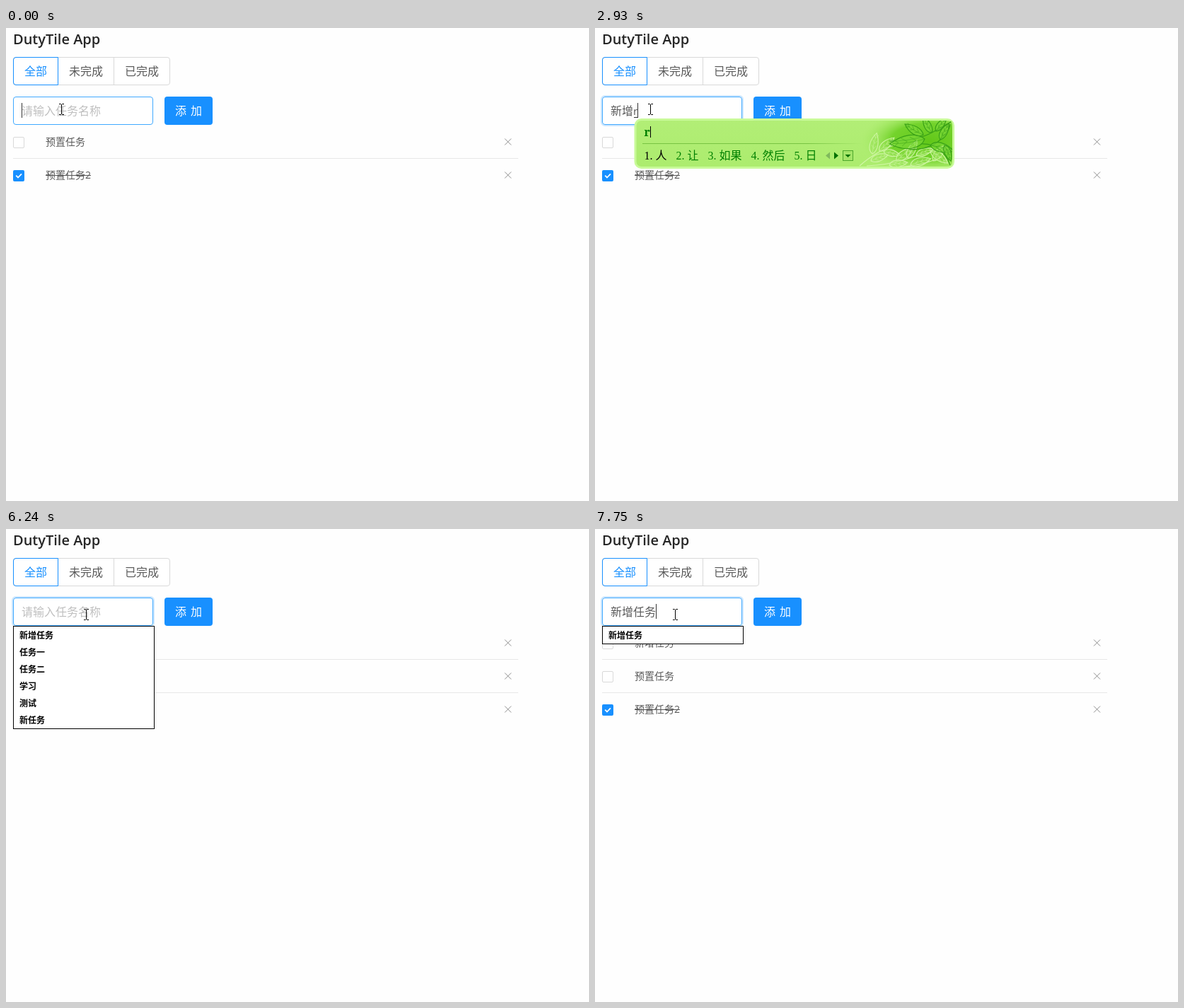
These frames come from a looping animation (824 by 669 pixels, 8 s). An HTML page:

```html
<!DOCTYPE html>
<html lang="zh">
<head>
<meta charset="utf-8">
<title>DutyTile App</title>
<style>
html, body { margin: 0; width: 100%; height: 100%; overflow: hidden; background: #fefefe; }
svg { display: block; width: 824px; height: 669px; }
text { font-family: "Open Sans", "Noto Sans CJK SC", "Noto Sans CJK", sans-serif; font-size: 16px; fill: #595959; white-space: pre; }
.title { font-size: 20px; fill: #262626; font-weight: 600; }
.item { font-size: 14px; }
.latin { font-size: 15px; }
.digit { font-family: "Liberation Serif", serif; }
.pinyin { font: bold 16px "Noto Serif", serif; fill: #008000; }
.hint { font-size: 12px; font-weight: 700; fill: #000; }
</style>
</head>
<body>
<svg viewBox="0 0 824 669">
  <defs>
    <linearGradient id="panel" x2="0" y2="1">
      <stop offset="0" stop-color="#b2ee76"/><stop offset="1" stop-color="#acec6e"/>
    </linearGradient>
    <linearGradient id="rule">
      <stop offset="0" stop-color="#78c442"/><stop offset=".75" stop-color="#78c442"/>
      <stop offset="1" stop-color="#78c442" stop-opacity="0"/>
    </linearGradient>
    <radialGradient id="glade" cx=".76" cy=".45" r=".72">
      <stop offset="0" stop-color="#62c719"/><stop offset=".55" stop-color="#74d32c"/>
      <stop offset="1" stop-color="#aeed70" stop-opacity="0"/>
    </radialGradient>
    <clipPath id="artClip"><path d="M-140 3H-9Q-3 3 -3 9V62Q-3 68 -9 68H-140Z"/></clipPath>
    <g id="art" clip-path="url(#artClip)"></g>
  </defs>
  <g id="page"></g><g id="list"></g><g id="field"></g><g id="drop"></g><g id="ime"></g><g id="mouse"></g>
</svg>
<script>
const LOOP = 8000;
const $ = id => document.getElementById(id);
const text = (x, y, s, cls = '', fill = '') =>
  `<text x="${x}" y="${y}" class="${cls}"${fill && ` style="fill:${fill}"`}>${s}</text>`;
const rect = (x, y, w, h, fill, stroke = 'none', r = 0, extra = '') =>
  `<rect x="${x}" y="${y}" width="${w}" height="${h}" rx="${r}" fill="${fill}" stroke="${stroke}" ${extra}/>`;
const path = (d, stroke, w = 1, fill = 'none') =>
  `<path d="${d}" fill="${fill}" stroke="${stroke}" stroke-width="${w}"/>`;

// Tracks hold [start, value]; the latest started value applies.
const at = (track, t) => {
  let v = track[0][1];
  for (const [start, next] of track) if (start <= t) v = next;
  return v;
};

const input = [
  [0, ''], [1130, 'xin'], [1530, 'xinz'], [1650, 'xinze'], [1770, 'xinzen'], [2200, 'xinzeng'],
  [2510, '新增'], [2930, '新增r'], [3050, '新增renw'], [3180, '新增renwu'], [3300, '新增任务'], [3990, ''],
  [6390, 'x'], [6540, 'xinz'], [6820, 'xinzen'], [6940, 'xinzeng'],
  [7240, '新增'], [7480, '新增r'], [7630, '新增renwu'], [7750, '新增任务']
];
const caret = [
  [0, 1], [550, 0], [1130, 1], [2510, 0], [2630, 1], [3840, 0], [3990, 1], [4140, 0],
  [4710, 1], [5260, 0], [5530, 1], [6240, 0], [6390, 1]
];
const glow = [[0, 0], [150, .5], [270, 1]];
const fade = [[0, 1], [3840, .6], [3990, .7], [4140, .85], [4290, 1]];

const wide = '新增 心脏 新政 信中 心中', grown = '新增 新 心 信 欣', tasks = '任务 人物 人无 任吾 仁武';
const ime = [
  [0, null],
  [990, [26, 'x', '想 先 下 写 ↓']], [1130, [26, 'xin', '新 心 信 欣 辛']],
  [1530, [26, "xin'z", wide]], [1650, [26, "xin'ze", wide]],
  [1770, [26, "xin'zen", '新增 心怎 信怎 新怎 欣']], [2200, [26, "xin'zeng", grown]], [2510, null],
  [2930, [56, 'r', '人 让 如果 然后 日']], [3050, [56, "ren'w", '任务 人物 任务书 人为 认为']],
  [3180, [56, "ren'wu", tasks]], [3300, null],
  [6390, [33, 'x', '想 先 下 写 ↓']], [6540, [33, "xin'z", wide]],
  [6820, [33, "xin'zen", '新增 心怎 信怎 新怎 欣']], [6940, [33, "xin'zeng", grown]], [7240, null],
  [7480, [56, 'r', '人 让 如果 然后 日']], [7630, [56, "ren'wu", tasks]], [7750, null]
];

const history = ['新增任务', '任务一', '任务二', '学习', '测试', '新任务'];
const drop = [
  [0, null], [5530, [history, .5]], [5650, [history, 1]], [6390, null],
  [7360, [['新增任务'], 1]], [7480, null], [7750, [['新增任务'], 1]]
];

const mouse = [
  [0, ['beam', 78, 115]], [3600, ['beam', 92, 112]], [3720, ['beam', 120, 108]], [3840, ['beam', 165, 103]],
  [3990, ['arrow', 244, 54]], [4290, ['arrow', 174, 160]], [4440, ['arrow', 156, 154]],
  [4560, ['arrow', 140, 157]], [4710, ['arrow', 116, 155]], [4830, ['arrow', 100, 153]],
  [4990, ['beam', 99, 98]], [5110, ['beam', 100, 91]], [5260, ['beam', 113, 121]]
];

function drawPage() {
  $('page').innerHTML =
    text(10, 23, 'DutyTile App', 'title') +
    rect(10.5, 41.5, 221, 39, '#fff', '#d9d9d9', 3.5) + path('M152.5 42V80', '#d9d9d9') +
    path('M73.5 41.5H14Q10.5 41.5 10.5 45V77Q10.5 80.5 14 80.5H73.5Z', '#1890ff') +
    text(26, 67, '全部', '', '#1890ff') + text(89, 67, '未完成') + text(168, 67, '已完成') +
    rect(224, 97, 68, 40, '#1890ff', 'none', 4) +
    text(239, 123, '添', '', '#fff') + text(261, 123, '加', '', '#fff');
}

function drawList(t) {
  const rows = ['预置任务', '预置任务2'];
  if (t >= 3990) rows.unshift('新增任务');
  $('list').setAttribute('opacity', at(fade, t));
  $('list').innerHTML = rows.map((name, i) => {
    const y = 161 + 47 * i, done = name.endsWith('2');
    return (done
      ? rect(10, y - 7, 16, 16, '#1890ff', 'none', 2) + path(`M14.2 ${y + .6}l2.8 2.9 5-5.2`, '#fff', 1.8)
      : rect(10.5, y - 6.5, 15, 15, '#fff', '#d9d9d9', 1.5)) +
      text(56, y + 5, name, 'item') +
      (done ? path(`M56 ${y + .5}h64`, '#595959') : '') +
      path(`M705 ${y - 4.5}l9 9m0-9l-9 9`, '#8c8c8c') +
      (i < rows.length - 1 ? path(`M10 ${y + 23.5}H724`, '#e8e8e8') : '');
  }).join('');
}

function drawField(t) {
  const s = at(input, t), typed = s.replace(/[^a-z]/g, ''), done = s.slice(0, s.length - typed.length);
  const start = 22 + 16 * done.length;
  const f = $('field');
  f.innerHTML =
    rect(9, 96, 200, 42, 'none', '#1890ff', 5, `stroke-width="2" stroke-opacity="${.2 * at(glow, t)}"`) +
    rect(10.5, 97.5, 197, 39, '#fff', '#40a9ff', 3.5) +
    (s ? text(22, 123, done) : text(22, 123, '请输入任务名称', '', '#bfbfbf')) +
    text(start, 123, typed, 'latin');
  const end = start + (typed ? Math.round(f.lastElementChild.getComputedTextLength()) : 0);
  f.insertAdjacentHTML('beforeend',
    (typed ? path(`M${start + 1} 126.5H${end}`, '#333') : '') +
    (at(caret, t) ? path(`M${end + .5} 106V127`, '#333') : ''));
}

function drawDrop(t) {
  const d = at(drop, t);
  $('drop').innerHTML = d ? `<g opacity="${d[1]}">` +
    rect(10.5, 137.5, 199, 24 * d[0].length + 1, '#fff', '#000') +
    d[0].map((s, i) => text(19, 155 + 24 * i, s, 'hint')).join('') + '</g>' : '';
}

function drawIme(t) {
  const state = at(ime, t), box = $('ime');
  if (!state) return void (box.innerHTML = '');
  const [left, keys, words] = state;
  let x = left + 13.5, items = '';
  words.split(' ').forEach((word, i) => {
    const fill = i ? '#008000' : '#000';
    items += text(x, 186, i + 1 + '.', 'digit', fill) + text(x + 16, 186, word, '', fill);
    x += 29 + 16 * word.length;
  });
  const a = Math.round(x - 1), right = a + 182;
  box.innerHTML =
    rect(left - .5, 128, right - left + .5, 71, '#c8fa98', 'none', 10) +
    rect(left + 2.5, 131, right - left - 5.5, 65, 'url(#panel)', 'none', 7) +
    `<use href="#art" x="${right}" y="128"/>` +
    rect(left + 11, 163, a + 52 - left - 11, 1, 'url(#rule)') + items +
    path(`M${a + 6} 175.5v10l-6-5z`, 'none', 0, '#7fb95c') +
    path(`M${a + 12} 175.5v10l6-5z`, 'none', 0, '#007000') +
    rect(a + 24.5, 173.5, 14, 14, '#a4e568', '#4ea82c') +
    path(`M${a + 27.5} 179h8l-4 4z`, 'none', 0, '#007000') +
    text(left + 13.5, 153, keys, 'pinyin');
  const end = left + 14.5 + Math.round(box.lastElementChild.getComputedTextLength());
  box.insertAdjacentHTML('beforeend', path(`M${end} 139V155`, '#000'));
}

function drawMouse(t) {
  const [kind, x, y] = at(mouse, t);
  $('mouse').innerHTML = kind === 'beam'
    ? path(`M${x - 3} ${y - 7.5}h2.5l1 1 1-1h2.5M${x + .5} ${y - 7}v14M${x - 3} ${y + 7.5}h2.5l1-1 1 1h2.5`, '#000')
    : path(`M${x + .5} ${y + .5}v16l3.8-3.6 2.6 5.6 2.4-1-2.6-5.5h4.8z`, '#000', 1, '#fff');
}

// Foliage, measured from the top right corner of the panel.
function leaf(x, y, len, turn, ink, fill) {
  const w = len * .28;
  let veins = `M0 0Q${len / 2} ${-w / 4} ${len * .92} 0`;
  for (let k = .25; k < .8; k += .25)
    veins += `M${len * k} 0l${len * .16} ${-w * .4}M${len * k} 0l${len * .16} ${w * .4}`;
  return `<g transform="translate(${x} ${y}) rotate(${turn})">` +
    path(`M0 0C${len * .15} ${-w} ${len * .6} ${-w} ${len} 0C${len * .6} ${w * .8} ${len * .2} ${w * .8} 0 0Z`, ink, 1.2, fill) +
    path(veins, ink, .5) + '</g>';
}
function drawArt() {
  const pale = [
    [-116, 50, 30, -78], [-106, 46, 28, -42], [-118, 60, 26, -20], [-100, 47, 24, 12],
    [-82, 60, 30, -38], [-66, 56, 28, -62], [-54, 52, 26, -20], [-62, 66, 30, -18],
    [-30, 60, 28, -52], [-34, 46, 30, 35], [-92, 66, 26, -8]
  ];
  const dark = [
    [-42, 29, 50, 172], [-44, 23, 30, -150], [-32, 20, 26, -118], [-26, 18, 24, -52],
    [-20, 30, 26, -62], [-34, 38, 34, 14], [-14, 38, 24, 68]
  ];
  $('art').innerHTML = rect(-140, 3, 137, 65, 'url(#glade)') +
    path('M-134 67Q-122 56 -106 47T-84 38M-124 67Q-96 66 -70 58T-26 46M-84 69Q-46 68 -18 54', '#d2f7a8', 1.2) +
    pale.map(p => leaf(...p, '#cdf5a0', '#98e25766')).join('') +
    path('M-92 32Q-54 32 -32 20T-4 4M-64 44Q-34 44 -20 30T-6 8M-48 36Q-18 34 -6 66', '#38a016', 1.2) +
    dark.map(p => leaf(...p, '#38a016', '#7edb3c88')).join('');
}

const tracks = [input, caret, glow, fade, ime, drop, mouse];
let last;
function frame(now) {
  const t = now % LOOP;
  const key = tracks.map(track => track.filter(([start]) => start <= t).length).join();
  if (key !== last) {
    [drawList, drawField, drawDrop, drawIme, drawMouse].forEach(draw => draw(t));
    last = key;
  }
  requestAnimationFrame(time => frame(Math.max(0, time - origin)));
}

drawPage();
drawArt();
const origin = performance.now();
frame(0);
</script>
</body>
</html>
```
